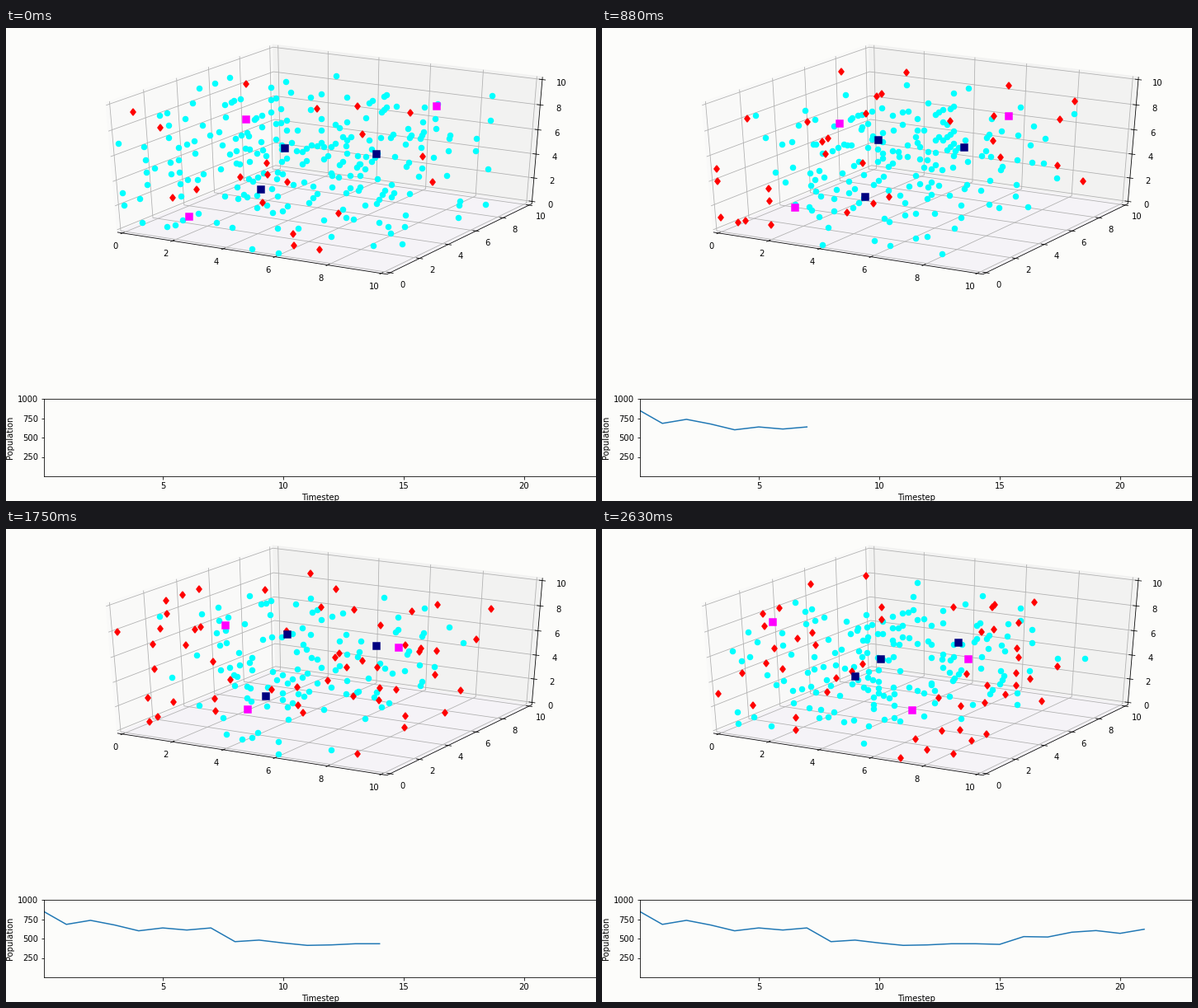
A matplotlib script for the animation above (2.76 s loop, 715 by 574 pixels).

```python
import numpy as np
import matplotlib.pyplot as plt
from matplotlib.animation import FuncAnimation
from matplotlib.collections import LineCollection

W, H = 715, 574
STEPS, STEP_MS, TICK_MS, LOOP_MS = 22, 125, 20, 2760
LO, HI = -10 / 48, 10 + 10 / 48      # the panes reach a little past 0..10
PAPER, GRID = "#fcfcfa", "#b0b0b0"

plt.rcParams.update({"font.family": "DejaVu Sans", "font.size": 10})

population = np.array([860, 683, 735, 675, 600, 637, 610, 637, 460, 480, 443,
                       412, 418, 433, 433, 425, 525, 520, 582, 603, 567, 620])


def project(points):
    """Perspective view (elevation 30, azimuth -60) in stage pixels."""
    q = np.asarray(points, float) / 10 - 0.5
    elev, azim = np.radians([30, -60])
    right = np.array([-np.sin(azim), np.cos(azim), 0])
    toward = np.array([np.cos(elev) * np.cos(azim),
                       np.cos(elev) * np.sin(azim), np.sin(elev)])
    up = np.cross(toward, right)
    scale = 10 / (10 - q @ toward)
    return np.stack([390.1 + 362.1 * (q @ right) * scale,
                     154.5 - 172.5 * (q @ up) * scale], axis=-1)


# Cluster centres of each species: where they start and end.
prey_path = np.array([[(336, 134), (318, 200), (450, 150)],
                      [(331, 155), (315, 182), (425, 137)]])
hunter_path = np.array([[(300, 115), (212, 232), (515, 97)],
                        [(205, 118), (389, 213), (440, 165)]])


def centres(path, step, rng):
    """Ease from start to end with a small wobble."""
    start, end = path
    return start + (end - start) * (step / (STEPS - 1)) ** 2 + rng.normal(0, 7, (3, 2))


def nearest(sites, centre, spread=(65, 38)):
    """Squared distance to the closest centre, in units of spread."""
    gaps = (sites[:, None] - centre[None]) / spread
    return (gaps ** 2).sum(-1).min(1)


def simulate():
    """Both species live on a 10x10x10 lattice, denser near their centres."""
    rng = np.random.default_rng(12)
    sites = project(np.indices((10, 10, 10)).reshape(3, -1).T)
    luck = rng.gumbel(size=(2, len(sites)))
    states = []
    for step in range(STEPS):
        prey_at = centres(prey_path, step, rng)
        hunter_at = centres(hunter_path, step, rng)
        to_prey, to_hunter = nearest(sites, prey_at), nearest(sites, hunter_at)
        pull = np.interp(step, [0, 10, 21], [0.03, 0.4, 0.25])
        fear = np.interp(step, [0, 3, 10, 21], [0, 0.4, 0.35, 0.15])
        prey_score = luck[0] - pull * to_prey
        hunter_score = luck[1] - 0.8 * fear * to_hunter + fear * np.minimum(to_prey, 7)

        prey = np.argsort(-prey_score)[:int(population[step] / 3.7)]
        hunter_score[prey] = -np.inf
        count = int(np.interp(step, [0, 10, 18, 21], [20, 36, 72, 50]))
        hunters = np.argsort(-hunter_score)[:count]
        states.append((sites[prey], sites[hunters], prey_at, hunter_at))

        redraw = rng.random(luck.shape) < 0.35
        luck = np.where(redraw, rng.gumbel(size=luck.shape), luck)
    return states


fig = plt.figure(figsize=(W / 72, H / 72), dpi=72, facecolor=PAPER)
stage = fig.add_axes([0, 0, 1, 1])
stage.set(xlim=(0, W), ylim=(H, 0))
stage.axis("off")


def draw_box():
    panes = [
        ("#f9f9f8", [(LO, LO, LO), (LO, HI, LO), (LO, HI, HI), (LO, LO, HI)]),
        ("#f2f2f1", [(LO, HI, LO), (HI, HI, LO), (HI, HI, HI), (LO, HI, HI)]),
        ("#f5f3f7", [(LO, LO, LO), (HI, LO, LO), (HI, HI, LO), (LO, HI, LO)])]
    for color, corners in panes:
        stage.fill(*project(corners).T, fc=color, ec=color, lw=1)

    grid, ticks = [], []
    reach, gap = 0.125, 0.465
    for k in range(0, 11, 2):
        grid += [[(k, LO, LO), (k, HI, LO), (k, HI, HI)],
                 [(HI, k, LO), (LO, k, LO), (LO, k, HI)],
                 [(LO, LO, k), (LO, HI, k), (HI, HI, k)]]
        ticks += [[(k, LO - reach, LO), (k, LO + reach, LO)],
                  [(HI - reach, k, LO), (HI + reach, k, LO)],
                  [(HI - reach, HI, k), (HI + reach, HI, k)]]
        for point in [(k, LO - gap, LO - gap), (HI + gap, k, LO - gap),
                      (HI + gap, HI + gap, k)]:
            x, y = project(point)
            stage.text(x, y + 0.6, str(k), ha="center", va="top")
    axes = [[(LO, LO, LO), (HI, LO, LO), (HI, HI, LO), (HI, HI, HI)]]
    for lines, color in ((grid, GRID), (axes + ticks, "black")):
        stage.add_collection(LineCollection([project(line) for line in lines],
                                            colors=color, linewidths=0.8))


def markers(shape, color, size):
    return stage.plot([], [], shape, color=color, ms=size, mew=1.5,
                      ls="none", zorder=3)[0]


draw_box()
groups = [markers("o", "cyan", 6), markers("d", "red", 6),
          markers("s", "navy", 7.2), markers("s", "magenta", 7.2)]

chart = fig.add_axes([46 / W, 30 / H, 670 / W, 94 / H], facecolor=PAPER)
chart.set(xlim=(0.07, 23.02), ylim=(0, 1000),
          xticks=range(5, 21, 5), yticks=range(250, 1001, 250),
          xlabel="Timestep", ylabel="Population")
curve, = chart.plot([], [], color="#1f77b4", lw=1.5)

states = simulate()


def update(frame):
    step = min((frame * TICK_MS + TICK_MS // 2) // STEP_MS, STEPS - 1)
    for group, points in zip(groups, states[step]):
        group.set_data(*points.T)
    curve.set_data(range(step + 1), population[:step + 1])
    return [*groups, curve]


anim = FuncAnimation(fig, update, frames=LOOP_MS // TICK_MS, interval=TICK_MS,
                     init_func=lambda: update(0), repeat=True, repeat_delay=0)
plt.show()
```
